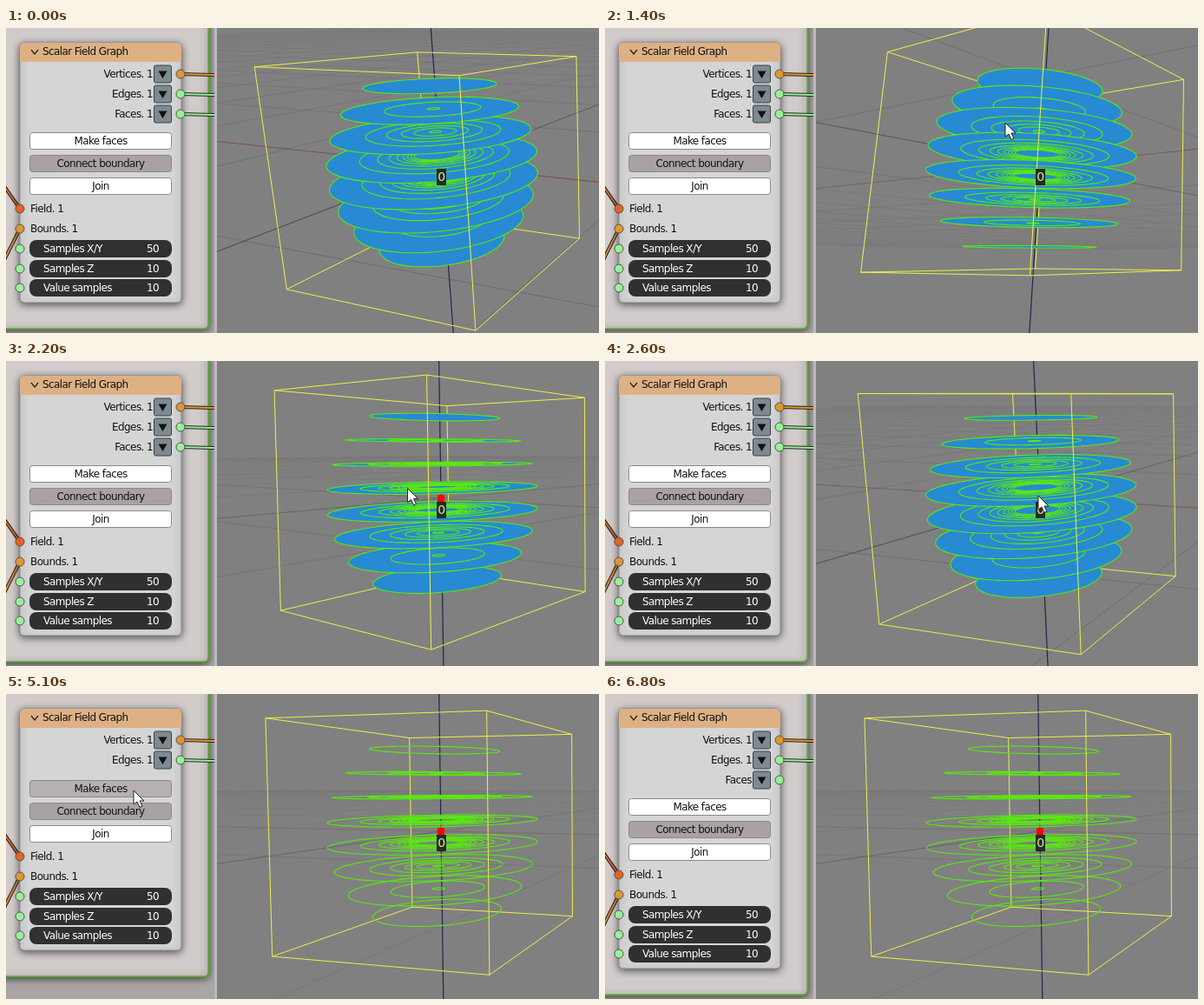
Recreate the animation shown at these times as an HTML page with a canvas. Size 683 by 351 pixels, loop 7200 ms.

```html
<!DOCTYPE html>
<html lang="en">
<head>
<meta charset="utf-8">
<title>Scalar Field Graph</title>
<style>
html, body { margin: 0; width: 100%; height: 100%; overflow: hidden; background: #808080; }
canvas { display: block; }
</style>
</head>
<body>
<canvas id="stage" width="683" height="351"></canvas>
<script>
const ctx = document.getElementById('stage').getContext('2d');
const LOOP = 7200, STEP = 100;
const ORANGE = '#e0962f', GREEN = '#98f098', RED = '#e66222', YELLOW = '#efef4a';

// time, yaw, pitch (degrees)
const VIEW = [[900, 20, 13], [1400, 28, -11.3], [1500, 32, -14], [1800, 44.5, -3],
  [2600, 17, 8.4], [2800, 13.5, 2.6]];
// time, x, y of the pointer tip
const POINTER = [[400, 672, 175], [700, 487, 146], [900, 487, 146], [1400, 461, 109],
  [1500, 452, 106], [1800, 426, 138], [2600, 499, 155], [2800, 504, 146], [3200, 504, 146],
  [3700, 250, 125], [4000, 160, 127], [4100, 151, 126], [4900, 151, 126], [5100, 147, 111],
  [5500, 147, 111], [5900, 163, 118], [6200, 163, 118], [6800, 690, 44]];

function track(keys, t) {
  const i = keys.findIndex(k => k[0] > t);
  if (i === 0) return keys[0].slice(1);
  if (i < 0) return keys[keys.length - 1].slice(1);
  const a = keys[i - 1], b = keys[i];
  return mix(a, b, (t - a[0]) / (b[0] - a[0])).slice(1);
}
const mix = (a, b, f) => a.map((v, i) => v + (b[i] - v) * f);

// --- 3D view: off-axis perspective, orbiting the origin ---
const DIST = 5.47, SCALE = 119, CENTER = [708, 135], SHIFT = [-207, 23];
let cosY, sinY, cosP, sinP, eye;

function setView(yaw, pitch) {
  const rad = Math.PI / 180;
  cosY = Math.cos(yaw * rad); sinY = Math.sin(yaw * rad);
  cosP = Math.cos(pitch * rad); sinP = Math.sin(pitch * rad);
  eye = SHIFT[1] / SCALE * cosP + DIST * sinP;
}
function toCamera([u, v, z]) {
  const depth = v * cosY - u * sinY;
  return [SCALE * (u * cosY + v * sinY) + SHIFT[0],
    -SCALE * (z * cosP + depth * sinP) + SHIFT[1],
    1 + (depth * cosP - z * sinP) / DIST];
}
const toScreen = ([x, y, m]) => [CENTER[0] + x / m, CENTER[1] + y / m];

function line3(a, b, color, width = 1) {
  const NEAR = 0.06;
  let p = toCamera(a), q = toCamera(b);
  if (p[2] > q[2]) [p, q] = [q, p];
  if (q[2] < NEAR) return;
  if (p[2] < NEAR) p = mix(p, q, (NEAR - p[2]) / (q[2] - p[2]));
  line([toScreen(p), toScreen(q)], color, width);
}
function line(points, color, width = 1) {
  ctx.beginPath();
  points.forEach(p => ctx.lineTo(...p));
  ctx.strokeStyle = color;
  ctx.lineWidth = width;
  ctx.stroke();
}

// Floor lines fade where they are seen at a grazing angle
function floorLine(at, color, strength) {
  const END = 40, PIECE = 4;
  for (let s = -END; s < END; s += PIECE) {
    const m = Math.max(0.3, toCamera(at(s + PIECE / 2))[2]);
    const slope = Math.min(1, Math.abs(eye) / (m * DIST));
    ctx.globalAlpha = strength * (1 - (1 - slope) ** 4);
    line3(at(s), at(s + PIECE), color);
  }
  ctx.globalAlpha = 1;
}
function floor() {
  const GAP = 2, N = 20;
  for (let i = -N; i <= N; i++) {
    if (!i) continue;
    floorLine(n => [i * GAP, n, 0], '#505050', 0.45);
    floorLine(n => [n, i * GAP, 0], '#505050', 0.45);
  }
  floorLine(n => [n, 0, 0], '#74383e', 1);
  floorLine(n => [0, n, 0], '#2c4638', 1);
}

function boxEdges(far) {
  const c = [[-1, -1], [1, -1], [1, 1], [-1, 1]];
  c.forEach((p, i) => {
    const q = c[(i + 1) % 4];
    if ((i > 1) === far) for (const z of [-1, 1]) line3([...p, z], [...q, z], YELLOW);
    if ((i === 3) === far) line3([...p, -1], [...p, 1], YELLOW);
  });
}

// Contours of 1/distance at evenly spaced values
function disc(z, filled) {
  const SIZE = 0.965, OFFSET = -0.02;
  for (let j = 0; j < 9; j++) {
    const r2 = 1 / (1.01 + 0.39 * j) ** 2 - z * z;
    if (r2 <= 0) break;
    const r = SIZE * Math.sqrt(r2);
    ctx.beginPath();
    for (let a = 0; a < 64; a++) {
      const w = a * Math.PI / 32;
      const p = [OFFSET + r * Math.cos(w), OFFSET + r * Math.sin(w), z];
      ctx.lineTo(...toScreen(toCamera(p)));
    }
    ctx.closePath();
    if (filled && !j) { ctx.fillStyle = '#288ad2'; ctx.fill(); }
    ctx.strokeStyle = '#58e810';
    ctx.lineWidth = 1.1;
    ctx.stroke();
  }
}

function viewport(t) {
  setView(...track(VIEW, t));
  ctx.save();
  ctx.beginPath();
  ctx.rect(243, 0, 440, 351);
  ctx.clip();
  ctx.fillStyle = '#808080';
  ctx.fillRect(243, 0, 440, 351);
  floor();
  line3([0, 0, -4], [0, 0, 4], '#222252', 1.2);
  boxEdges(true);
  const layers = [-7, -5, -3, -1, 0, 1, 3, 5, 7]
    .sort((a, b) => Math.abs(b / 9 - eye) - Math.abs(a / 9 - eye));
  for (const i of layers) {
    if (i) disc(i / 9, t < 4500);
    else { ctx.fillStyle = '#f00'; ctx.fillRect(497, 154, 8, 8); }
  }
  boxEdges(false);
  ctx.fillStyle = '#262a22';
  ctx.fillRect(496, 162, 11, 19);
  text('0', 501.5, 176, '#cdeea0', 'center', 14);
  ctx.restore();
}

// --- Node panel ---
function text(s, x, y, color = '#111', align = 'left', size = 12) {
  ctx.font = `${size}px "DejaVu Sans", sans-serif`;
  ctx.letterSpacing = '-0.6px';
  ctx.textAlign = align;
  ctx.fillStyle = color;
  ctx.fillText(s, x, y);
}
function box(x, y, w, h, r, fill, stroke, width = 1) {
  ctx.beginPath();
  ctx.roundRect(x, y, w, h, r);
  ctx.fillStyle = fill;
  ctx.fill();
  if (!stroke) return;
  ctx.strokeStyle = stroke;
  ctx.lineWidth = width;
  ctx.stroke();
}
function shadowed(draw) {
  ctx.save();
  ctx.shadowColor = 'rgba(0,0,0,.6)';
  ctx.shadowBlur = 9;
  ctx.shadowOffsetY = 2;
  draw();
  ctx.restore();
}
function socket(x, y, color) {
  box(x - 5, y - 5, 10, 10, 5, color, '#555');
}
function link(a, b, color) {
  line([a, b], '#222', 4);
  line([a, b], color, 2);
}
function output(name, y, color, linked) {
  text(name, 169, y + 4, '#111', 'right');
  box(170.5, y - 10, 20, 20, 2, '#7d8a92', '#3c4144');
  ctx.beginPath();
  ctx.moveTo(175.5, y - 3.5); ctx.lineTo(185.5, y - 3.5); ctx.lineTo(180.5, y + 5);
  ctx.fillStyle = '#111';
  ctx.fill();
  if (linked) link([201, y], [240, y + 1], color);
  socket(201, y, color);
}
function button(name, y, fill) {
  box(27.5, y - 9.5, 163, 19, 3, fill, '#8d8888');
  text(name, 109, y + 4, '#111', 'center');
}
function slider(name, value, y) {
  box(27, y - 10, 164, 20, 8, '#303030');
  text(name, 43, y + 4, '#fff');
  text(value, 176, y + 4, '#fff', 'right');
  socket(16, y, GREEN);
}

function panel(t) {
  const off = t >= 4500 && t < 5600, dy = off ? -21 : 0;
  ctx.save();
  ctx.beginPath();
  ctx.rect(0, 0, 243, 351);
  ctx.clip();
  ctx.fillStyle = '#aaa6a6';
  ctx.fillRect(0, 0, 243, 351);
  shadowed(() => box(-20, -20, 253, 366 + dy, 5, '#d1cbcb', '#55b52b', 1.6));
  ctx.fillStyle = '#bababa';
  ctx.fillRect(240, 0, 3, 351);
  link([-2, 182 + dy], [16, 208 + dy], '#d2662a');
  link([-2, 267 + dy], [16, 231 + dy], '#d08a35');
  shadowed(() => box(16, 17, 186, 299 + dy, 5, '#d5d5d5', '#888'));
  box(16, 17, 186, 22, [5, 5, 0, 0], '#deb184');
  line([[29, 25], [33, 30], [37, 25]], '#222', 1.3);
  text('Scalar Field Graph', 42, 31);

  output('Vertices. 1', 53, ORANGE, true);
  output('Edges. 1', 76, GREEN, true);
  if (!off) output(t < 4500 ? 'Faces. 1' : 'Faces', 99, GREEN, t < 4500);

  const hover = off && t >= 5000;
  button('Make faces', 130 + dy, off ? (hover ? '#b8b0b0' : '#aaa2a2') : '#fff');
  button('Connect boundary', 156 + dy, off && !hover ? '#b8b0b0' : '#aaa2a2');
  button('Join', 182 + dy, '#fff');
  text('Field. 1', 28, 212 + dy);
  socket(16, 208 + dy, RED);
  text('Bounds. 1', 28, 235 + dy);
  socket(16, 231 + dy, ORANGE);
  slider('Samples X/Y', '50', 254 + dy);
  slider('Samples Z', '10', 277 + dy);
  slider('Value samples', '10', 299 + dy);
  ctx.restore();
}

function pointer(t) {
  if (t < 400 || t >= 6800) return;
  const [x, y] = track(POINTER, t);
  ctx.beginPath();
  for (const [dx, dy] of [[0, 0], [0, 16], [4, 13], [7, 19.5], [10, 18], [7, 12], [12, 12]])
    ctx.lineTo(x + dx, y + dy);
  ctx.closePath();
  ctx.fillStyle = '#fff';
  ctx.fill();
  ctx.strokeStyle = '#222';
  ctx.lineWidth = 1;
  ctx.stroke();
}

function draw() {
  const t = Math.floor(performance.now() % LOOP / STEP) * STEP;
  viewport(t);
  panel(t);
  pointer(t);
  requestAnimationFrame(draw);
}
draw();
</script>
</body>
</html>
```
